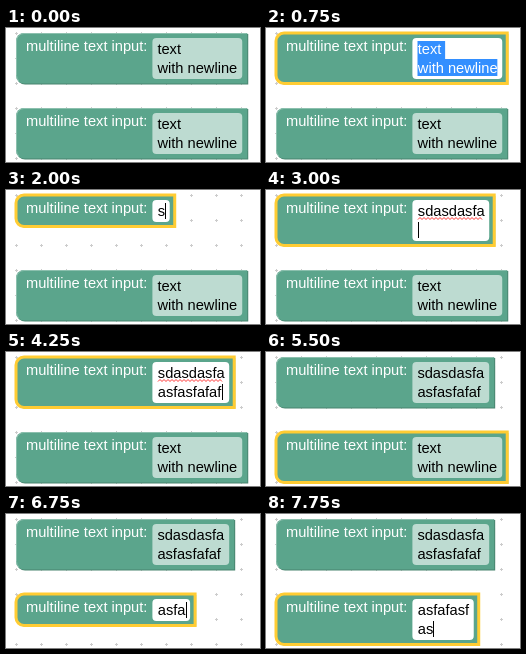
Recreate the animation shown at these times as an HTML page. Size 254 by 134 pixels, loop 8 s.

```html
<!DOCTYPE html>
<html lang="en">
<head>
<meta charset="utf-8">
<title>Multiline text blocks</title>
<style>
html, body { margin: 0; width: 100%; height: 100%; overflow: hidden; background: #fff; }
svg { display: block; width: 100%; height: 100%; }
text { font: 14.667px "Liberation Sans", Arial, sans-serif; white-space: pre; }
.label { fill: #fff; }
.body { fill: #5ba58c; }
.dark { fill: #49846f; }
.light { fill: none; stroke: #8cc0ae; }
.field { fill: #fff; fill-opacity: .6; }
.selected .body { stroke: #fc3; stroke-width: 3; }
.selected .light { display: none; }
.editing .field { fill-opacity: 1; }
.mark { fill: #338fff; }
.marked .line { fill: #fff; }
.wave { fill: none; stroke: #f33; stroke-width: 1; }
</style>
</head>
<body>
<svg id="stage" viewBox="0 0 254 134">
  <defs>
    <pattern id="grid" x="-2" y="-7" width="25" height="25" patternUnits="userSpaceOnUse">
      <path d="M11 12.5h3M12.5 11v3" stroke="#ccc"/>
    </pattern>
  </defs>
  <rect width="254" height="134" fill="url(#grid)"/>
</svg>
<script>
const LOOP = 8000, LEFT = 146.4, LINE = 19;
const stage = document.getElementById('stage');

function add(parent, tag, attrs) {
  const el = document.createElementNS('http://www.w3.org/2000/svg', tag);
  set(el, attrs);
  return parent.appendChild(el);
}
function set(el, attrs) {
  for (const key in attrs) el.setAttribute(key, attrs[key]);
}
function show(el, on) {
  el.style.display = on ? '' : 'none';
}

function makeBlock(y) {
  const g = add(stage, 'g', { transform: `translate(0 ${y})` });
  const part = (tag, name, attrs) => add(g, tag, { class: name, ...attrs });
  const b = {
    g,
    dark: part('path', 'dark', { transform: 'translate(1 1)' }),
    body: part('path', 'body'),
    light: part('path', 'light'),
    field: part('rect', 'field', { x: LEFT, y: 10, rx: 4 }),
    marks: [0, 1].map(i => part('rect', 'mark', { x: 151.5, y: 13 + 18 * i, height: 18 - i })),
    lines: [0, 1].map(i => part('text', 'line', { y: 26 + LINE * i })),
    wave: part('path', 'wave'),
    caret: part('rect', 'caret', { width: 1, height: 16 })
  };
  part('text', 'label', { x: 20, y: 23 }).textContent = 'multiline text input:';
  return b;
}

function draw(b, s) {
  const key = JSON.stringify(s);
  if (b.key === key) return;
  b.key = key;

  const rows = s.text.split('\n');
  const editing = s.mode === 'edit' || s.mode === 'marked';
  const x = editing ? 151.8 : 151.4;
  const widths = b.lines.map((el, i) => {
    el.textContent = rows[i] || '';
    set(el, { x });
    return rows[i] ? el.getComputedTextLength() : 0;
  });

  const width = Math.max(...widths) + 10;
  const height = 22 + LINE * (rows.length - 1);
  const right = LEFT + width + 5, bottom = height + 14.5;
  const shape = `M10 13a8 8 0 0 1 8-8H${right}V${bottom}H18a8 8 0 0 1-8-8z`;
  set(b.body, { d: shape });
  set(b.dark, { d: shape });
  set(b.light, { d: `M12.7 ${bottom - 2.7}A7.5 7.5 0 0 1 10.5 ${bottom - 8}V13a7.5 7.5 0 0 1 7.5-7.5H${right - .5}` });
  set(b.field, { width, height });
  set(b.g, { class: `${s.mode ? 'selected' : ''} ${editing ? 'editing' : ''} ${s.mode}` });

  b.marks.forEach((el, i) => {
    show(el, s.mode === 'marked');
    set(el, { width: widths[i] + (i ? 0 : 4) });
  });

  const last = rows.length - 1;
  show(b.caret, s.caret);
  set(b.caret, { x: Math.round(152 + widths[last]), y: 13 + LINE * last });

  show(b.wave, s.wave);
  let d = 'M152 29.5';
  for (let i = 0; i < Math.floor(widths[0] / 4); i++) d += 'l2-2l2 2';
  set(b.wave, { d });
}

// Characters present after each quarter-second tick of typing.
function typed(text, counts, start, t) {
  let n = 0;
  for (const [at, count] of counts) if (t >= start + at) n = count;
  return text.slice(0, n);
}

const OLD = 'text\nwith newline';
const FIRST = 'sdasdasfa\nasfasfafaf';
const SECOND = 'asfafasf\nas';
const FIRST_KEYS = [[0, 1], [250, 3], [500, 6], [750, 9], [1000, 10],
  [1250, 11], [1500, 13], [1750, 15], [2000, 17], [2250, 20]];
const SECOND_KEYS = [[0, 1], [250, 4], [500, 8], [750, 9], [1250, 11]];

function modeAt(t, select, open, type, leave) {
  if (t < select || t >= leave) return '';
  return t < open ? 'selected' : t < type ? 'marked' : 'edit';
}

function stateOne(t) {
  const mode = modeAt(t, 250, 750, 2000, 5500);
  return {
    mode,
    text: t < 2000 ? OLD : typed(FIRST, FIRST_KEYS, 2000, t),
    caret: mode === 'edit' && !(t >= 4750 && t < 5250),
    wave: mode === 'edit' && t >= 3000
  };
}
function stateTwo(t) {
  const mode = modeAt(t, 5500, 5750, 6500, LOOP);
  return {
    mode,
    text: t < 6500 ? OLD : typed(SECOND, SECOND_KEYS, 6500, t),
    caret: mode === 'edit',
    wave: false
  };
}

const one = makeBlock(0), two = makeBlock(75);
const start = performance.now();
function tick() {
  const t = (performance.now() - start) % LOOP;
  draw(one, stateOne(t));
  draw(two, stateTwo(t));
  requestAnimationFrame(tick);
}
tick();
</script>
</body>
</html>
```
